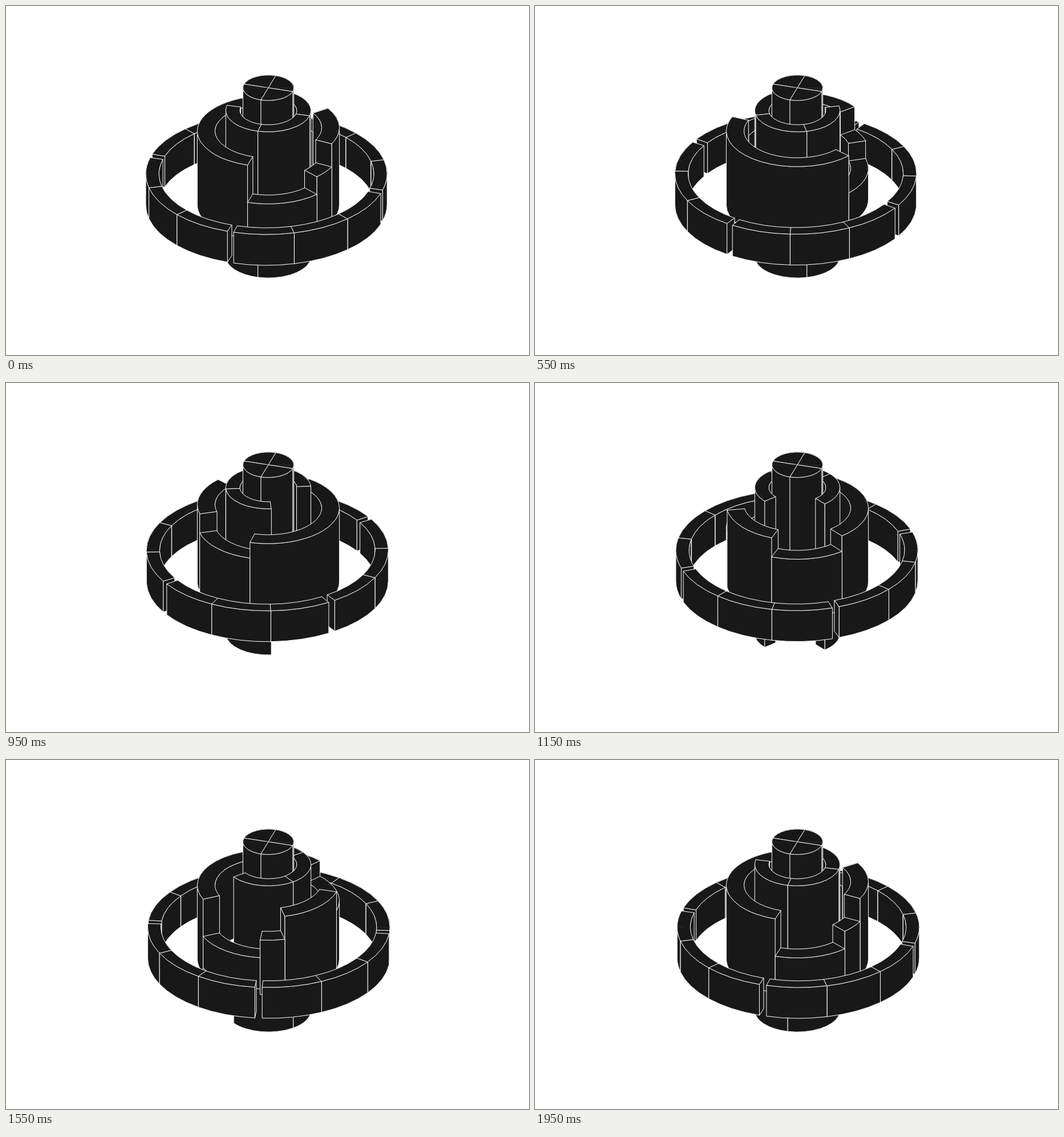
Animation of 917 by 611 pixels, one loop 2 s. Source, as an HTML page:

```html
<!DOCTYPE html>
<html lang="en">
<head>
<meta charset="utf-8">
<title>Rotating rings</title>
<style>
  html, body { margin: 0; width: 100%; height: 100%; overflow: hidden; background: #fff; }
  svg { display: block; width: 917px; height: 611px; }
  path { stroke-linejoin: round; stroke-linecap: round; }
  .face { fill: #181818; stroke: #fff; }
  .fill { fill: #181818; stroke: #181818; stroke-width: .6; }
  .edge { fill: none; stroke: #fff; }
</style>
</head>
<body>
<svg id="stage" viewBox="0 0 917 611"></svg>
<script>
const stage = document.getElementById('stage');
const LOOP = 2000, STEP = 50, POSES = 60;
const TILT = 0.5;
const cos = deg => Math.cos(deg * Math.PI / 180);
const sin = deg => Math.sin(deg * Math.PI / 180);

// Angles run clockwise on screen: 0 is right, 90 is the side nearest the viewer.
// A block is [start angle, span, height of its top on screen, extras].
const quarters = (start, count, top) =>
  Array.from({ length: count }, (_, i) => [start + 90 * i, 90, top]);

// The hoop is four groups of three blocks; its rear half sits slightly further out.
const GAP = 3.1, PART = (90 - GAP) / 3;
const hoopBlocks = Array.from({ length: 12 }, (_, i) => {
  const group = Math.floor(i / 3);
  return [17.3 + GAP / 2 + 90 * group + PART * (i % 3), PART, 294.4, { slip: group < 2 ? 0 : -1.5 }];
});

const shaft = { inner: 0, outer: 44.6, bottom: 400, turn: 0, blocks: quarters(17, 4, 143.2) };
const sleeve = { inner: 50, outer: 74.7, bottom: 438.8, turn: 360, blocks: quarters(284.2, 3, 183) };
const cam = {
  inner: 93.6, outer: 124.6, bottom: 348.5, turn: -360,
  blocks: [[107, 160, 219], [267, 60, 246.3], [327, 60, 213], [27, 20, 253.3],
           [47, 60, 284.2, { bottom: 339 }]]
};
const hoop = {
  inner: 188.5, outer: 211.6, bottom: 348.4, turn: 90, blocks: hoopBlocks,
  pivot: 460.4, offset: [-3.78, -0.4]
};
const rings = [hoop, cam, sleeve, shaft];

const ease = x => x * x * (3 - 2 * x);

// Cut a block where it passes between the far and near halves
function split([start, span, top, extras], turn) {
  const a = (((start + turn) % 360) + 360) % 360, b = a + span;
  const cuts = [a, ...[180, 360, 540].filter(c => c > a && c < b), b];
  return cuts.slice(1).map((end, i) => {
    const shift = cuts[i] >= 360 ? 360 : 0;
    const s = cuts[i] - shift, e = end - shift;
    const near = (s + e) / 2 < 180;
    const far = s <= 270 && e >= 270 ? 180
      : Math.max(180 - Math.abs(270 - s), 180 - Math.abs(270 - e));
    const close = s <= 90 && e >= 90 ? 0 : Math.min(Math.abs(s - 90), Math.abs(e - 90));
    return { s, e, top, near, depth: near ? close : far,
             realStart: i === 0, realEnd: i === cuts.length - 2, ...extras };
  });
}

function drawPiece(ring, piece, turn) {
  const { inner, outer, pivot = 460, offset = [0, 0] } = ring;
  const { s, e, near, slip = 0 } = piece;
  const ox = offset[0], oy = offset[1] + slip;
  const cx = pivot + ox * cos(turn) - oy * sin(turn);
  const dy = TILT * (ox * sin(turn) + oy * cos(turn));
  const top = piece.top + dy, bottom = (piece.bottom || ring.bottom) + dy;

  const pt = (r, a, y) => `${(cx + r * cos(a)).toFixed(2)} ${(y + r * TILT * sin(a)).toFixed(2)}`;
  const arc = (r, a, y, sweep) => `A${r} ${r * TILT} 0 0 ${sweep} ${pt(r, a, y)}`;
  const path = (kind, d) => `<path class="${kind}" d="${d}"/>`;

  const wall = r => path('face',
    `M${pt(r, s, top)}${arc(r, e, top, 1)}L${pt(r, e, bottom)}${arc(r, s, bottom, 0)}Z`);
  const cap = a => path('face',
    `M${pt(inner, a, top)}L${pt(outer, a, top)}L${pt(outer, a, bottom)}L${pt(inner, a, bottom)}Z`);
  const spoke = a => `M${pt(inner, a, top)}L${pt(outer, a, top)}`;
  const rim = r => `M${pt(r, s, top)}${arc(r, e, top, 1)}`;

  let out = '';
  if (near) out += wall(outer);
  else if (inner) out += wall(inner);
  if (inner && piece.realStart && cos(s) < 0) out += cap(s);
  if (inner && piece.realEnd && cos(e) > 0) out += cap(e);
  const innerEdge = inner ? arc(inner, s, top, 0) : '';
  out += path('fill', `${rim(outer)}L${pt(inner, e, top)}${innerEdge}Z`);
  out += path('edge', rim(outer) + (inner ? rim(inner) : '') +
    (piece.realStart ? spoke(s) : '') + (piece.realEnd ? spoke(e) : ''));
  return out;
}

function drawHalf(ring, near, progress) {
  const turn = ring.turn * progress;
  return ring.blocks.flatMap(block => split(block, turn))
    .filter(piece => piece.near === near)
    .sort((p, q) => q.depth - p.depth)
    .map(piece => drawPiece(ring, piece, turn)).join('');
}

// The motion has 60 poses per loop, shown at 20 pictures a second
function render(ms) {
  const progress = ease(Math.floor(ms / LOOP * POSES + 1e-6) / POSES);
  const back = rings.map(ring => drawHalf(ring, false, progress));
  const front = [...rings].reverse().map(ring => drawHalf(ring, true, progress));
  stage.innerHTML = back.concat(front).join('');
}

const begin = performance.now();
let shown = -1;
function tick() {
  const ms = Math.floor(((performance.now() - begin) % LOOP) / STEP) * STEP;
  if (ms !== shown) render(shown = ms);
  requestAnimationFrame(tick);
}
tick();
</script>
</body>
</html>
```
